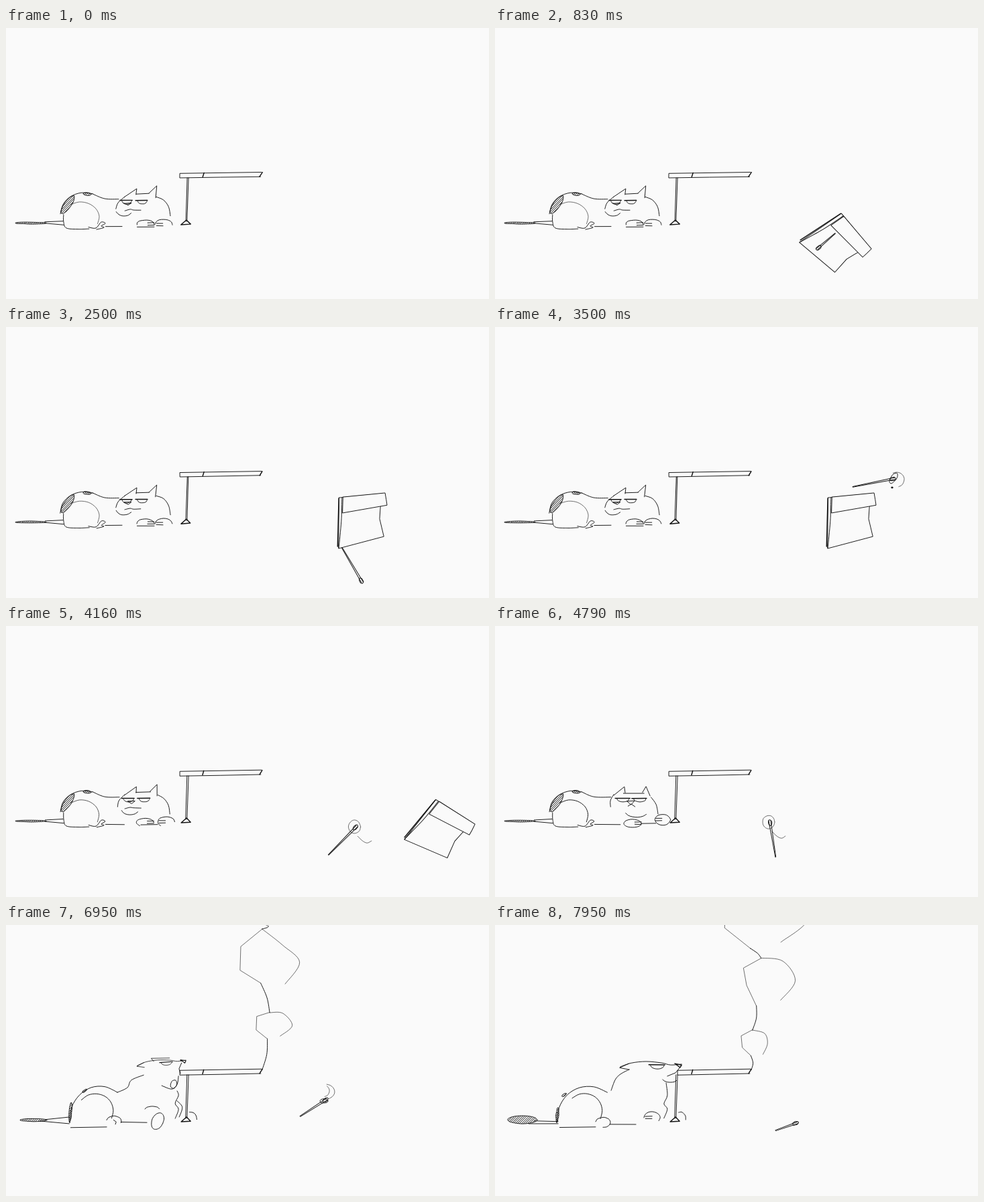
These frames come from a looping animation (720 by 405 pixels, 8000 ms). An HTML page with a canvas:

```html
<!DOCTYPE html>
<html lang="en">
<head>
<meta charset="utf-8">
<title>Cat and match</title>
<style>
html, body { margin: 0; width: 100%; height: 100%; overflow: hidden; background: #fafafa; }
canvas { display: block; width: 100vw; height: 100vh; }
</style>
</head>
<body>
<canvas id="stage" width="720" height="405"></canvas>
<script>
const LOOP = 8000, STEP = 50, PAPER = '#fafafa', INK = '#141414';
const THIN = 0.6, FINE = 0.95, BOLD = 1.45;
const HOLDS = [[0, 200], [250, 410], [5660, 5830], [6040, 6200]];
const ctx = document.getElementById('stage').getContext('2d');

const mix = (a, b, u) => a + (b - a) * u;
const ramp = (t, from, to) => Math.min(1, Math.max(0, (t - from) / (to - from)));
const smooth = u => u * u * (3 - 2 * u);
const slowEnd = u => 1 - (1 - u) ** 2;
const rad = deg => deg * Math.PI / 180;
const random = (a, b) => {
  const s = Math.sin(a * 12.9898 + b * 78.233) * 43758.5453;
  return s - Math.floor(s);
};

// Every redraw shakes each point a little; the shake depends on the take.
let take = 0, mark = 0;
const shaky = v => v + (random(mark++, take) - 0.5) * 0.6;

function pairs(nums) {
  const pts = [];
  for (let i = 0; i < nums.length; i += 2) pts.push([shaky(nums[i]), shaky(nums[i + 1])]);
  return pts;
}

function stroke(path, width) {
  ctx.lineWidth = width;
  ctx.stroke(path);
  return path;
}

function line(width, ...nums) {
  const path = new Path2D();
  pairs(nums).forEach(p => path.lineTo(...p));
  return stroke(path, width);
}

function sheet(...nums) {
  const path = new Path2D();
  pairs(nums).forEach(p => path.lineTo(...p));
  path.closePath();
  ctx.fillStyle = PAPER;
  ctx.fill(path);
  stroke(path, FINE);
}

function curve(width, ...nums) {
  const pts = pairs(nums), path = new Path2D();
  path.moveTo(...pts[0]);
  for (let i = 1; i < pts.length; i++) {
    const a = pts[i - 1], b = pts[i], p = pts[i - 2] || a, q = pts[i + 1] || b;
    path.bezierCurveTo(a[0] + (b[0] - p[0]) / 6, a[1] + (b[1] - p[1]) / 6,
      b[0] - (q[0] - a[0]) / 6, b[1] - (q[1] - a[1]) / 6, b[0], b[1]);
  }
  return stroke(path, width);
}

function arc(width, x, y, rx, ry, from = 0, to = 360, tilt = 0) {
  const nums = [], n = Math.ceil((to - from) / 30), c = Math.cos(rad(tilt)), s = Math.sin(rad(tilt));
  for (let i = 0; i <= n; i++) {
    const a = rad(mix(from, to, i / n)), dx = rx * Math.cos(a), dy = ry * Math.sin(a);
    nums.push(x + dx * c - dy * s, y + dx * s + dy * c);
  }
  return curve(width, ...nums);
}

function spot(x, y, rx, ry, tilt = 0) {
  const outline = arc(FINE, x, y, rx, ry, 0, 360, tilt);
  ctx.save();
  ctx.clip(outline);
  for (let d = -2 * rx; d < 2 * rx; d += 3) line(FINE, x + d - rx, y + rx, x + d + rx, y - rx);
  ctx.restore();
}

function placed(x, y, angle, scale, paint) {
  ctx.save();
  ctx.translate(x, y);
  ctx.rotate(rad(angle));
  ctx.scale(scale, scale);
  paint();
  ctx.restore();
}

function eye(x, y, width, sag) {
  line(BOLD, x, y, x + width, y);
  arc(FINE, x + width / 2 + 1, y + 1, width / 2 - 2, sag, 0, 180);
}

function paw(x, y, rx, ry, from, to, toeX) {
  arc(FINE, x, y, rx, ry, from, to);
  for (const dy of [-2, 1.5]) line(FINE, x + toeX, y + dy, x + toeX + 10, y + dy);
}

// turn: 0 looks aside, 1 faces the viewer with a paw on the stand
function lyingCat(turn, grin) {
  const at = (a, b) => mix(a, b, turn);
  spot(37, 291.5, 23, 1.3);
  line(FINE, 58, 290, 85, 288.5);
  line(FINE, 58, 292, 86, 294.5);

  arc(FINE, 117, 278, 36, 32, 180, 290);
  curve(FINE, 129, 248, 147, 255, at(168, 173), 255.5);
  spot(92, 264, 16, 5, -55);
  spot(121, 248, 6, 2.2, 5);
  arc(at(THIN, FINE), 112, 283, 27, 23, 235, 385);
  curve(FINE, 86, 279, 86, 290, 90, 299, 108, 300.5, 124, 300);
  curve(FINE, 123, 297.5, 134, 299, 142, 290, 148, 292, 142, 296, 146, 298, 135, 301);
  line(FINE, 148, 296.5, at(173, 187), 296.5);

  line(FINE, at(176, 177), 253, at(195, 193), 240, 194, 249);
  line(FINE, at(194, 191), at(248, 250), at(213, 222), at(247, 250));
  line(FINE, at(213, 220), at(247, 249), 225, at(236, 240), at(223, 231), 254);
  curve(FINE, 177, 252, at(167, 172), 261, at(164, 172), 270);
  arc(FINE, 222, 281, at(23, 21), 29, at(-85, -60), 0);
  if (turn < 0.5 || grin) arc(FINE, at(176, 211), at(272, 277), at(12, 17), 9, 30, 165);

  eye(at(170, 179), 257.5, at(18, 22), 4.5);
  eye(at(193, 204), 257.5, at(18, 22), 4.5);
  const noseX = at(182, 203);
  line(FINE, noseX - 6, 262, noseX + 5, 261.5, noseX, at(265, 267), noseX - 6, 262);
  if (turn < 0.5) curve(FINE, 177, 273, 185, 271, 190, 272, 201, 272);
  else line(FINE, 198, 269, 203, 266, 209, 270);

  paw(at(208, 205), at(293, 295), 13, 6, at(170, 0), 360, 3);
  paw(at(235, 250), at(294, 289.5), at(13, 11.5), 8, at(180, 0), 360, -11);
  line(FINE, at(195, 218), at(297.5, 295), at(221, 240), at(297.5, 295));
}

// lift: 0 smokes at rest, 1 stretches up with the mouth open
function sittingCat(lift) {
  const at = (a, b) => mix(a, b, lift), open = lift > 0.5;
  spot(41, at(291, 291.5), at(22, 20), at(6, 2.2));
  line(FINE, 58, at(293, 291), 94, at(294, 287));
  line(FINE, 50, at(297, 293), 94, 297);

  arc(FINE, 140, 291, at(48, 45), 50, 175, 305);
  spot(at(93, 96), at(284, 280), at(11, 15), 2, 95);
  spot(at(103, 117), at(254, 248), 4, 1.5, -35);
  arc(FINE, 133, 278, 27, 26, at(228, 220), 385);
  line(FINE, 96, 302.5, 150, 302);
  arc(FINE, 161, at(295, 293), 11, 7.5, 190, at(450, 380));
  if (open) line(FINE, 160, 291, 164, 294, 163, 298);
  line(FINE, 171, at(298, 294.5), 210, at(298, 295));
  curve(FINE, at(173, 166), at(247, 250), at(179, 181), at(231, 243), at(187, 187), at(223, 232), at(200, 205), at(216, 224));

  placed(at(278, 268), at(208, 202), at(0, -4), at(1, 0.8), () => {
    line(FINE, -78, 8, -92, 5, -78, -1);
    curve(FINE, -91, 4, -75, -2, -53, -4, -30, -2, -16, 1, 0, 0);
    line(BOLD, -10, -1, 0, 1, -2, 5, -6, 2, -10, -1);
    eye(-49, 1, 24, 5);
    if (open) line(FINE, -60, -2, -64, -8, -30, -6);
  });
  if (open) {
    line(FINE, 262, 206, 258, 215, 260, 222);
    curve(FINE, 257, 226, 255, 238, 247, 245, 232, 240);
    arc(FINE, 250, 238, 4.5, 6.5, 0, 360, 20);
    arc(FINE, 218, 276, 11, 5, 190, 345);
    arc(FINE, 226, 293, 8.5, 13, 0, 360, 25);
    curve(FINE, 255, 263, 262, 270, 262, 277, 258, 287);
  } else {
    line(FINE, 278, 210, 269, 221, 257, 226);
    arc(FINE, 261, 230, 11, 5, 30, 170);
    paw(234, 288, 12, 9, 180, 390, -10);
  }
  curve(FINE, 255, at(236, 248), 257, 255, 252, 267, 257, 275, 252, 289);
  arc(FINE, 276, 290, 8.5, 10.5, 255, 365);
}

function drawCat(t, lift) {
  if (t < 6400) return lyingCat(smooth(ramp(t, 4050, 4350)), t < 5400);
  ctx.save();
  ctx.translate(0, 298);
  ctx.scale(1, mix(0.88, 1, ramp(t, 6400, 6700)));
  ctx.translate(0, -298);
  sittingCat(lift);
  ctx.restore();
}

function drawHolder(left) {
  line(FINE, 380, 222, 320, 223, left, 224, left, 217.5, 381, 215.5);
  line(BOLD, 382, 215.5, 378, 222);
  line(BOLD, 295, 216.5, 293, 222.5);
  for (const x of [270, 272]) line(FINE, x, 224, x - 2, 289);
  line(BOLD, 268, 288, 261, 294, 275, 293, 269, 287);
}

function drawMatch({ x, y, angle, length }) {
  placed(x, y, angle, 1, () => {
    for (const side of [-1.4, 1.4]) line(FINE, -2, side, length, side / 3);
    arc(FINE, 1, 0, 4.5, 2.5);
  });
}

function drawBook(t) {
  const toss = slowEnd(ramp(t, 410, 1450)), settle = smooth(ramp(t, 1450, 2100)), leave = ramp(t, 3730, 4450) ** 1.5;
  const x = mix(500, 511, toss) + 19 * settle + 260 * leave;
  const y = mix(470, 232, toss) + 58 * settle + 40 * leave;
  placed(x, y, mix(90, 33, toss) - 33 * settle + 85 * leave, 1, () => {
    sheet(-34, -35, 32, -41, 28, -20, 27, -3, 33, 23, -34, 41);
    if (t < 2000) drawMatch({ x: -11, y: 23, angle: 264, length: 34 });
    sheet(-28, -36, 35, -42, 37, -32, 38, -24, -28, -12);
    line(BOLD, -34, -34, -36, 38);
    curve(FINE, -29, -35, -30, 0, -34, 40);
  });
}

// Key poses of the match: pulled out, swung under the book, struck, lit, turned, set to the tip, shaken, dropped
const MATCH_POSES = [
  { t: 2000, x: 517, y: 311, angle: 264, length: 34 },
  { t: 2500, x: 530, y: 380, angle: 240, length: 58 },
  { t: 2950, x: 520, y: 325, angle: 185, length: 62 },
  { t: 3450, x: 594, y: 227, angle: 169, length: 62 },
  { t: 3700, x: 594, y: 227, angle: 169, length: 62 },
  { t: 4750, x: 410, y: 293, angle: 81, length: 53 },
  { t: 5350, x: 383, y: 224, angle: -4, length: 48 },
  { t: 6200, x: 386, y: 226, angle: -2, length: 48 },
  { t: 6950, x: 477, y: 261, angle: 147, length: 46 },
  { t: 7900, x: 449, y: 296, angle: 160, length: 33 }
];

function matchAt(t) {
  const i = Math.max(1, MATCH_POSES.findIndex(p => p.t > t));
  const last = t >= MATCH_POSES.at(-1).t;
  const a = MATCH_POSES[last ? MATCH_POSES.length - 2 : i - 1], b = last ? MATCH_POSES.at(-1) : MATCH_POSES[i];
  const u = smooth(ramp(t, a.t, b.t)), pose = {};
  for (const key of ['x', 'y', 'angle', 'length']) pose[key] = mix(a[key], b[key], u);
  const swing = t > 6200 && t < 6950 ? 75 : t >= 6950 ? 40 : t > 3700 && t < 4750 ? 50 : 0;
  pose.y += swing * Math.sin(Math.PI * u);
  return pose;
}

function drawMatchFire({ x, y }, t) {
  placed(x, y, 0, 1, () => {
    if (t >= 3150 && t < 3900) {
      arc(FINE, 0, -1, 4, 9, 0, 360, 35);
      arc(THIN, 5, 1, 11, 11, -120, 75);
      arc(BOLD, -2, 13, 1, 0.5);
    } else if (t >= 3900 && t < 5350) {
      arc(THIN, -2, 0, 9, 10);
      curve(THIN, 3, 14, 10, 21, 17, 24, 23, 21);
    } else if (t >= 6250 && t < 7350) {
      arc(FINE, -3, 2, 6, 3);
      arc(THIN, 0, -12, 13, 11, -85, 70);
      arc(THIN, -4, -13, 9, 9, -50, 75);
    }
  });
}

function drawTipFlame(t) {
  const tall = mix(20, 32, ramp(t, 5400, 5750));
  for (const spread of [0, 4]) {
    const nums = [];
    for (let u = 0; u <= 1; u += 0.2) nums.push(383 + 4.5 * Math.sin(u * 4.7) + spread * u + spread / 3, 222 - tall * u);
    curve(FINE, ...nums);
  }
  const top = 222 - tall;
  line(FINE, 379, top + 1, 375, top, 381, top - 10, 385, top - 8, 388, top, 383, top + 2);
}

// Angular puffs rise from the tip, widen with height and hang together by thin threads.
function drawSmoke(t) {
  const grow = smooth(ramp(t, 6200, 6850));
  let endX = 382, endY = 217;
  for (let n = 3; n >= -3; n--) {
    const height = (69 + (t - 6950) * 0.164 - 96 * n) * grow;
    if (height < 14) continue;
    const x = 396 + 9 * Math.sin(n * 2.4), y = 217 - height, r = (11 + 0.2 * height) * Math.sqrt(grow);
    const corners = [];
    for (let i = 0; i < 7; i++) {
      const a = rad(105 + 52 * i), reach = r * (0.75 + 0.5 * random(n + 9, i));
      corners.push(x + reach * Math.cos(a), y + 0.9 * reach * Math.sin(a));
    }
    curve(FINE, endX, endY, (endX + corners[0]) / 2 + 3, (endY + corners[1]) / 2, corners[0], corners[1]);
    line(THIN, ...corners.slice(0, 8));
    curve(THIN, ...corners.slice(6));
    [endX, endY] = corners.slice(6, 8);
  }
}

function draw(now) {
  let t = now % LOOP;
  const hold = HOLDS.find(([from, to]) => t >= from && t < to);
  t = hold ? hold[0] : Math.floor(t / STEP) * STEP;
  take = Math.floor(t / STEP) % 4;
  mark = 0;
  ctx.fillStyle = PAPER;
  ctx.fillRect(0, 0, 720, 405);
  ctx.strokeStyle = INK;
  ctx.lineCap = ctx.lineJoin = 'round';

  const lift = smooth(ramp(t, 6400, 6800)) - smooth(ramp(t, 7100, 7400));
  drawHolder(t < 6800 ? 259 : mix(272, 259, lift));
  drawCat(t, lift);
  if (t >= 410 && t < 4450) drawBook(t);
  if (t >= 2000) {
    const match = matchAt(t);
    drawMatch(match);
    drawMatchFire(match, t);
  }
  if (t >= 5400 && t < 6200) drawTipFlame(t);
  if (t >= 6200) drawSmoke(t);
}

function tick() {
  draw(performance.now());
  requestAnimationFrame(tick);
}
tick();
</script>
</body>
</html>
```
